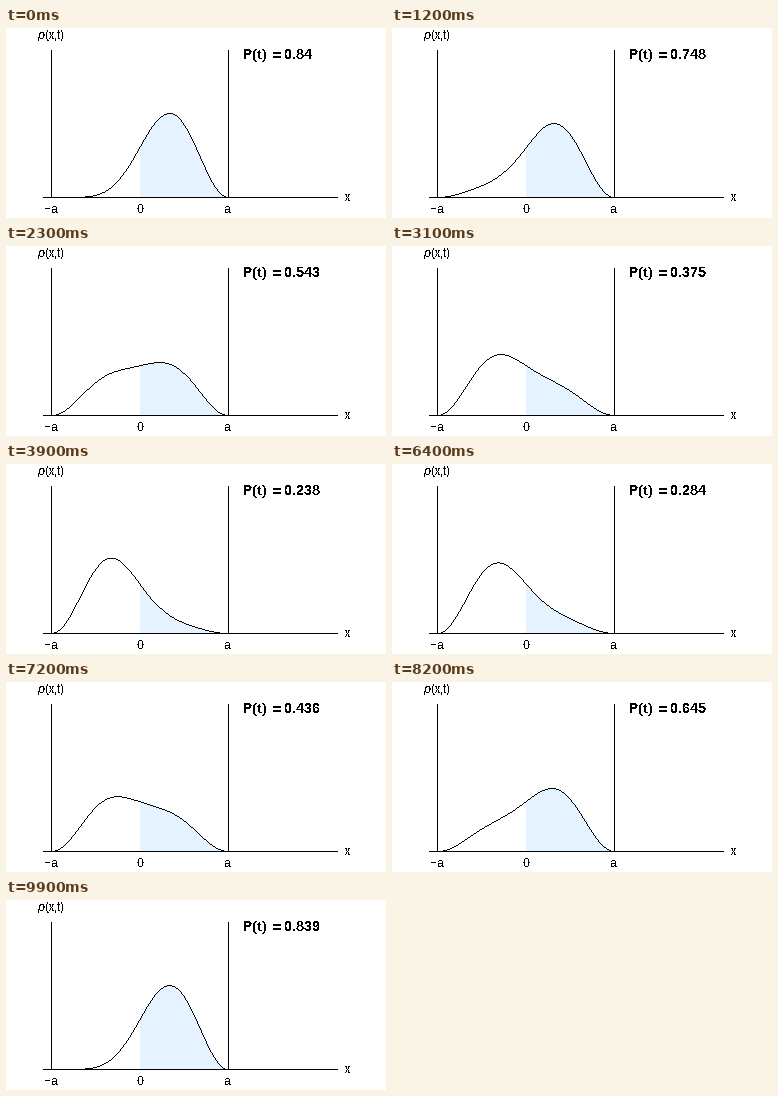
Write a matplotlib script that moves like this. It is 380 px wide and 190 px high and loops after 10 s.

```python
import numpy as np
import matplotlib.pyplot as plt
from matplotlib.animation import FuncAnimation

W, H, DPI = 380, 190, 100
FRAMES, INTERVAL = 100, 100
PX = 72 / DPI                      # one pixel in points
X0, A, BASE, SCALE = 134, 88.5, 169.5, 62.2
FILL = "#e5f2ff"

plt.rcParams.update({
    "font.family": "Liberation Sans",
    "text.hinting": "native",
    "text.hinting_factor": 1,
    "text.antialiased": False,
})

fig = plt.figure(figsize=(W / DPI, H / DPI), dpi=DPI, facecolor="white")
ax = fig.add_axes([0, 0, 1, 1])
ax.axis("off")

x = np.linspace(-1, 1, 201)
right = x >= -1e-9
u1 = 2 * np.cos(np.pi * x / 2)
u2 = np.sin(np.pi * x)


def density(phase):
    """Beating of the two lowest well states, weighted 4:1."""
    return (u1**2 + u2**2 + 2 * u1 * u2 * np.cos(phase)) / 5


def probability(phase):
    return 0.5 + 16 / (15 * np.pi) * np.cos(phase)


def trace(xs, ys):
    """Rasterise a curve as a crisp line one pixel wide."""
    step = np.maximum(abs(np.diff(xs)), abs(np.diff(ys)))
    s = np.append(0, np.cumsum(step))
    t = np.arange(0, s[-1])
    cols = np.interp(t, s, xs).astype(int)
    rows = np.interp(t, s, ys).astype(int)
    ink = np.zeros((H, W, 4))
    ink[rows, cols, 3] = 1
    return ink


def line(xs, ys):
    ax.plot(xs, ys, color="black", lw=PX, antialiased=False,
            solid_capstyle="butt", zorder=3)


def label(px, py, text, size=12, **kw):
    return ax.text(px, py, text, fontsize=size * PX, va="baseline", **kw)


line([37, 331], [169, 169])
for wall in (45, 222):
    line([wall, wall], [22, 169])

label(32, 11, "ρ", style="italic")
label(39, 11, "(x,t)")
label(45, 185, "−a", ha="center")
label(134, 185, "0", ha="center")
label(222, 185, "a", ha="center")
label(339, 173, "x")
label(237, 31, "P(t)", size=14, weight="bold")
label(266, 31, "=", size=13, weight="bold", family="DejaVu Sans")
value = label(278, 31, "", size=14, weight="bold")

px = X0 + A * x
area, = ax.fill([X0, X0 + A, X0], [BASE] * 3, color=FILL, lw=0,
                antialiased=False, zorder=1)
curve = ax.imshow(np.zeros((H, W, 4)), extent=(0, W, H, 0),
                  interpolation="nearest", aspect="auto", zorder=2)
ax.set(xlim=(0, W), ylim=(H, 0))


def update(i):
    phase = 2 * np.pi * i / FRAMES
    py = BASE - SCALE * density(phase)
    curve.set_data(trace(px, py))
    top = np.column_stack([px[right], py[right]])
    area.set_xy(np.vstack([[X0, BASE], top, [X0 + A, BASE]]))
    value.set_text(f"{probability(phase):.3g}")
    return area, curve, value


anim = FuncAnimation(fig, update, frames=FRAMES, interval=INTERVAL,
                     repeat=True, repeat_delay=0)
plt.show()
```
